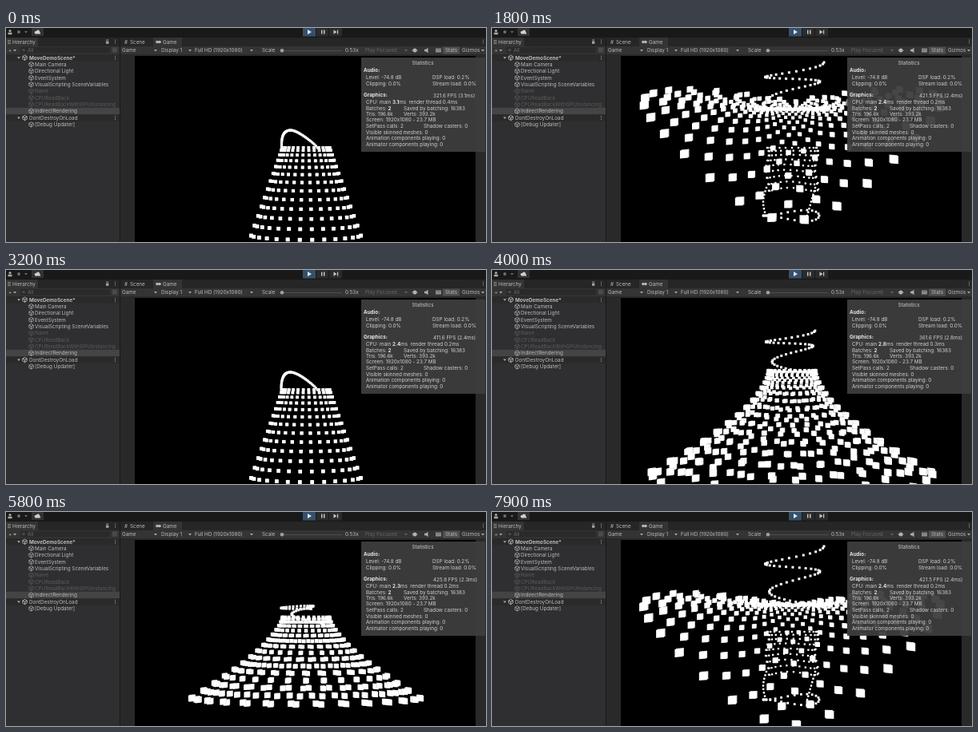
An HTML page with a canvas that plays this animation: 600x268 px, repeating every 8000 ms.

```html
<!DOCTYPE html>
<html lang="en">
<head>
<meta charset="utf-8">
<title>Instanced cube flow</title>
<style>
html, body { margin: 0; width: 100%; height: 100%; overflow: hidden; background: #191919; }
canvas { display: block; width: 600px; height: 268px; }
</style>
</head>
<body>
<canvas id="stage"></canvas>
<script>
const canvas = document.getElementById('stage');
const ctx = canvas.getContext('2d');
const dpr = window.devicePixelRatio || 1;
canvas.width = 600 * dpr;
canvas.height = 268 * dpr;
ctx.scale(dpr, dpr);

const LOOP = 8000, STEP = 100, PERIOD = 3.142;
const mix = (a, b, k) => a + (b - a) * k;

function box(x, y, w, h, color) {
  ctx.fillStyle = color;
  ctx.fillRect(x, y, w, h);
}

function shape(points, color) {
  ctx.fillStyle = color;
  ctx.beginPath();
  points.forEach(([x, y]) => ctx.lineTo(x, y));
  ctx.fill();
}

function dot(x, y, r, color) {
  ctx.fillStyle = color;
  ctx.beginPath();
  ctx.arc(x, y, r, 0, 7);
  ctx.fill();
}

// Draws text centred on y and returns the x where it ends.
function text(str, x, y, color = '#bcbcbc', weight = 400, align = 'left') {
  ctx.font = `${weight} 6.3px Inter, Roboto, sans-serif`;
  ctx.textAlign = align;
  ctx.textBaseline = 'alphabetic';
  ctx.fillStyle = color;
  ctx.fillText(str, x, y + 2.3);
  return x + ctx.measureText(str).width;
}

const arrow = (x, y, color = '#a8a8a8') =>
  shape([[x - 2, y - 1], [x + 2, y - 1], [x, y + 1.5]], color);

function cubeIcon(x, y, color) {
  ctx.strokeStyle = color;
  ctx.lineWidth = 0.7;
  ctx.beginPath();
  for (let i = 0; i < 6; i++) {
    const a = Math.PI / 6 + i * Math.PI / 3;
    ctx.lineTo(x + 3.1 * Math.cos(a), y + 3.1 * Math.sin(a));
  }
  ctx.closePath();
  for (const a of [-2.618, -0.524, 1.571]) {
    ctx.moveTo(x, y);
    ctx.lineTo(x + 3.1 * Math.cos(a), y + 3.1 * Math.sin(a));
  }
  ctx.stroke();
}

function kebab(x, y) {
  for (const d of [-2, 0, 2]) box(x, y + d - 0.4, 0.9, 0.9, '#b5b5b5');
}

function topBar() {
  box(0, 0, 600, 11, '#191919');
  dot(5, 3.5, 1.6, '#a8a8a8');
  box(2.5, 5.6, 5, 2.6, '#a8a8a8');
  dot(16, 5, 1.9, '#707070');
  arrow(25, 5, '#707070');
  box(32, 0, 15, 10, '#333');
  dot(37.5, 5.6, 1.8, '#d0d0d0');
  dot(40, 4.5, 2.1, '#d0d0d0');
  box(37, 5.4, 6, 2, '#d0d0d0');
  box(371, 0, 16, 10.5, '#35506b');
  box(388, 0, 15, 10.5, '#2b2b2b');
  box(404, 0, 16, 10.5, '#2b2b2b');
  shape([[377, 2], [382, 5], [377, 8]], '#e4e4e4');
  box(394, 2.5, 1.5, 5, '#c4c4c4');
  box(397, 2.5, 1.5, 5, '#c4c4c4');
  shape([[409.5, 2.3], [413.5, 5], [409.5, 7.7]], '#c4c4c4');
  box(414, 2.5, 1.2, 5, '#c4c4c4');
}

function hierarchy() {
  box(0, 12, 142, 256, '#2f2e30');
  box(0, 12, 142, 11, '#262627');
  box(0, 12, 40, 11, '#343435');
  for (const d of [-2, 0, 2]) box(2, 17 + d, 4, 0.8, '#a0a0a0');
  text('Hierarchy', 8, 17.5);
  box(125, 17, 3.4, 2.8, '#a0a0a0');
  ctx.strokeStyle = '#a0a0a0';
  ctx.lineWidth = 0.7;
  ctx.strokeRect(125.7, 14.8, 2, 2.3);
  kebab(136, 17);
  box(0, 23, 142, 10, '#343435');
  text('+', 3, 27.5);
  arrow(11, 28);
  box(18, 24, 112, 7.5, '#2a2a2b');
  text('All', 27, 28, '#6c6c6c');
  dot(22, 27.5, 1.6, '#6c6c6c');
  dot(22, 27.5, 0.9, '#2a2a2b');
  box(133, 24.5, 6, 6, '#4a4a4a');

  box(0, 33, 142, 8.2, '#2a2a2b');
  box(0, 99.8, 142, 8.4, '#444445');
  box(0, 108.4, 142, 8.2, '#2a2a2b');
  const rows = ['MoveDemoScene*', 'Main Camera', 'Directional Light', 'EventSystem',
    'VisualScripting SceneVariables', 'Naive', 'CPUReadBack', 'CPUReadBackWithGPUInstancing',
    'IndirectRendering', 'DontDestroyOnLoad', '[Debug Updater]'];
  rows.forEach((name, i) => {
    const y = 37.2 + i * 8.37, scene = i === 0 || i === 9;
    const color = i > 4 && i < 8 ? '#5c5c5c' : '#bebebe';
    if (scene) {
      arrow(16, y);
      cubeIcon(23.5, y, '#ddd');
      kebab(136, y);
    } else {
      cubeIcon(31.5, y, color);
    }
    text(name, scene ? 29 : 36, y, color, i ? 400 : 700);
  });
}

function gameChrome() {
  box(143, 12, 457, 256, '#29292a');
  box(143, 12, 457, 11, '#262627');
  box(184, 12, 36, 11, '#343435');
  text('#', 148, 17.5);
  text('Scene', 155, 17.5);
  dot(189, 17.5, 1.8, '#b8b8b8');
  dot(192, 17.5, 1.8, '#b8b8b8');
  text('Game', 196, 17.5);
  kebab(596, 17);
  box(143, 23, 457, 10, '#343435');
  text('Game', 145, 28);
  text('Display 1', 194, 28);
  text('Full HD (1920x1080)', 236, 28);
  text('Scale', 320, 28);
  box(344, 28, 76, 0.8, '#565656');
  dot(345, 28.3, 2.3, '#a0a0a0');
  text('0.53x', 424, 28);
  text('Play Focused', 449, 28, '#666');
  for (const x of [187, 230, 307, 596]) arrow(x, 28);
  arrow(500, 28, '#666');
  dot(511, 28, 2.5, '#b0b0b0');
  box(507.5, 27.6, 7, 0.8, '#b0b0b0');
  shape([[523, 26.8], [525, 26.8], [527.5, 24.8], [527.5, 31.2], [525, 29.2], [523, 29.2]], '#b0b0b0');
  box(537, 25.5, 7, 5, '#8c8c8c');
  for (const x of [538, 540, 542]) box(x, 26.7, 0.8, 0.8, '#343435');
  box(546, 23.5, 21, 9, '#4e4e4f');
  text('Stats', 549, 28);
  text('Gizmos', 570, 28);
  box(161, 35, 426, 233, '#000');
}

function cube(x, y, s) {
  if (s < 5) return box(x - s / 2, y - s / 2, s, s, '#fff');
  const h = s * 0.44, d = s * 0.12 * Math.sign(375 - x), tilt = (x - 375) * s * 0.0003;
  const face = (dx, dy, color) => shape([
    [x - h + dx, y - h - tilt + dy], [x + h + dx, y - h + tilt + dy],
    [x + h + dx, y + h + tilt + dy], [x - h + dx, y + h - tilt + dy]], color);
  face(d, -s * 0.08, '#e6e6e6');
  face(0, 0, '#fff');
}

function cubes(t) {
  const phase = t % PERIOD;
  const boost = 1 + 0.12 * Math.exp(-(((t - 4.95) / 0.9) ** 2));
  const wave = Math.sin(phase - 0.05) ** 2;
  const s = wave * boost;
  const flare = 1 - (1 - wave) ** 2.5;
  const open = flare ** 8;
  const bend = 1 + 2.4 * wave * (1 - wave);
  const rimY = 300 - 175 * s + 90 * s * Math.sin(2 * phase);
  const rimX = (83 + 103 * flare) * boost;
  const rimDrop = 8 + 142 * open * boost ** 1.6;
  const neckY = mix(150 - 35 * flare, rimY, 0.6 * open * open);

  // Flaring skirt: rings from the narrow neck out to the rim,
  // its front half spread by perspective once it lies open.
  const RINGS = 16, COUNT = 28;
  for (let i = 0; i < RINGS; i++) {
    const w = (i / (RINGS - 1)) ** (1.4 + 0.9 * open);
    const rx = 30 + (rimX - 30) * w ** bend;
    const cy = mix(neckY, rimY, w);
    for (let j = 0; j < COUNT; j++) {
      const a = (j + 0.5) / COUNT * 2 * Math.PI + 0.11 * i * wave;
      const sn = Math.sin(a), back = sn < 0;
      const dy = back
        ? -8 * sn * (1 - open) - 15 * open * Math.abs(Math.sin(2 * a))
        : rimDrop * sn / mix(1, 2.8 - 1.8 * sn, open);
      const size = (3.5 + w * (1.5 + 6.5 * flare)) * (back ? 1 + 0.4 * sn * open : 1);
      cube(375 + rx * Math.cos(a), cy + dy * w, size);
    }
  }

  // Far ridge that uncoils upwards into a winding trail.
  const topY = 128 - 85 * flare ** 1.5, TRAIL = 52;
  for (let i = 0; i < TRAIL; i++) {
    const k = i / (TRAIL - 1);
    const lowX = 344 + 45 * k ** 2;
    const lowY = 150 - 22 * Math.sin(Math.PI * k) ** 0.8;
    const highX = 377 + (28 + 10 * (1 - k)) * Math.cos(4 * Math.PI * k);
    const highY = mix(topY, neckY, k) + 5 * Math.sin(9 * k);
    cube(mix(lowX, highX, flare), mix(lowY, highY, flare), 3);
  }

  // Distant net and its hanging loop, seen once the skirt has lifted.
  const m = Math.max(0, Math.min(1, (wave - 0.55) / 0.3));
  if (!m) return;
  for (let r = 0; r < 9; r++) {
    for (let c = 0; c < 13; c++) {
      const v = r / 8;
      cube(375 + 31 * Math.cos(Math.PI * c / 12) + 2 * Math.sin(r),
        150 + 52 * m * v ** 1.25 + 2 * Math.sin(c * 0.7) * v, 2.3);
    }
  }
  const loopY = 150 + mix(85, 105, (boost - 1) / 0.12) * m;
  for (let i = 0; i < 26; i++) {
    const a = i / 26 * 2 * Math.PI;
    cube(374 + 35 * Math.cos(a), loopY + 5 * Math.sin(a) + 3 * Math.sin(2 * a), 2.8);
  }
  for (let i = 0; i < 9; i++) {
    const k = i / 8;
    cube(343 - 4 * Math.sin(3 * k), mix(150 + 50 * m, loopY, k), 2.4);
    cube(404 - 10 * k, mix(150 + 50 * m, loopY, k), 2.4);
  }
}

// Start time, frames per second, main thread ms, render thread ms.
const readings = [
  [0, '321.6', '3.1', '0.4'], [1300, '421.5', '2.4', '0.2'],
  [2600, '411.6', '2.4', '0.2'], [3700, '361.6', '2.8', '0.3'],
  [4600, '425.8', '2.3', '0.2'], [5900, '436.1', '2.3', '0.2'],
  [7300, '421.5', '2.4', '0.2']];

function stats(ms) {
  const [, fps, main, render] = readings.filter(r => r[0] <= ms).pop();
  box(444, 37, 155, 118, 'rgba(62,62,63,0.95)');
  const line = (str, x, y) => text(str, x, y, '#d0d0d0');
  const bold = (str, x, y) => text(str, x, y, '#e6e6e6', 700);
  text('Statistics', 521, 43.5, '#d0d0d0', 400, 'center');
  bold('Audio:', 447, 52.5);
  line('Level: -74.8 dB', 450, 62);
  line('DSP load: 0.2%', 533, 62);
  line('Clipping: 0.0%', 450, 70);
  line('Stream load: 0.0%', 533, 70);
  bold('Graphics:', 447, 84);
  line(`${fps} FPS (${main}ms)`, 534, 84.5);
  let x = line('CPU: main ', 450, 93);
  x = bold(main, x, 93);
  line(`ms  render thread ${render}ms`, x, 93);
  x = line('Batches: ', 450, 100.5);
  bold('2', x, 100.5);
  line('Saved by batching: 16383', 497, 100.5);
  line('Tris: 196.6k', 450, 107.5);
  line('Verts: 393.2k', 497, 107.5);
  line('Screen: 1920x1080 - 23.7 MB', 450, 115);
  line('SetPass calls: 2', 450, 122.7);
  line('Shadow casters: 0', 522, 122.7);
  line('Visible skinned meshes: 0', 450, 130.3);
  line('Animation components playing: 0', 450, 138);
  line('Animator components playing: 0', 450, 145.5);
}

function draw(now) {
  const ms = Math.floor(now % LOOP / STEP) * STEP;
  box(0, 0, 600, 268, '#191919');
  topBar();
  hierarchy();
  gameChrome();
  ctx.save();
  ctx.beginPath();
  ctx.rect(161, 35, 426, 233);
  ctx.clip();
  cubes(ms / 1000);
  ctx.restore();
  stats(ms);
  requestAnimationFrame(draw);
}
requestAnimationFrame(draw);
</script>
</body>
</html>
```
